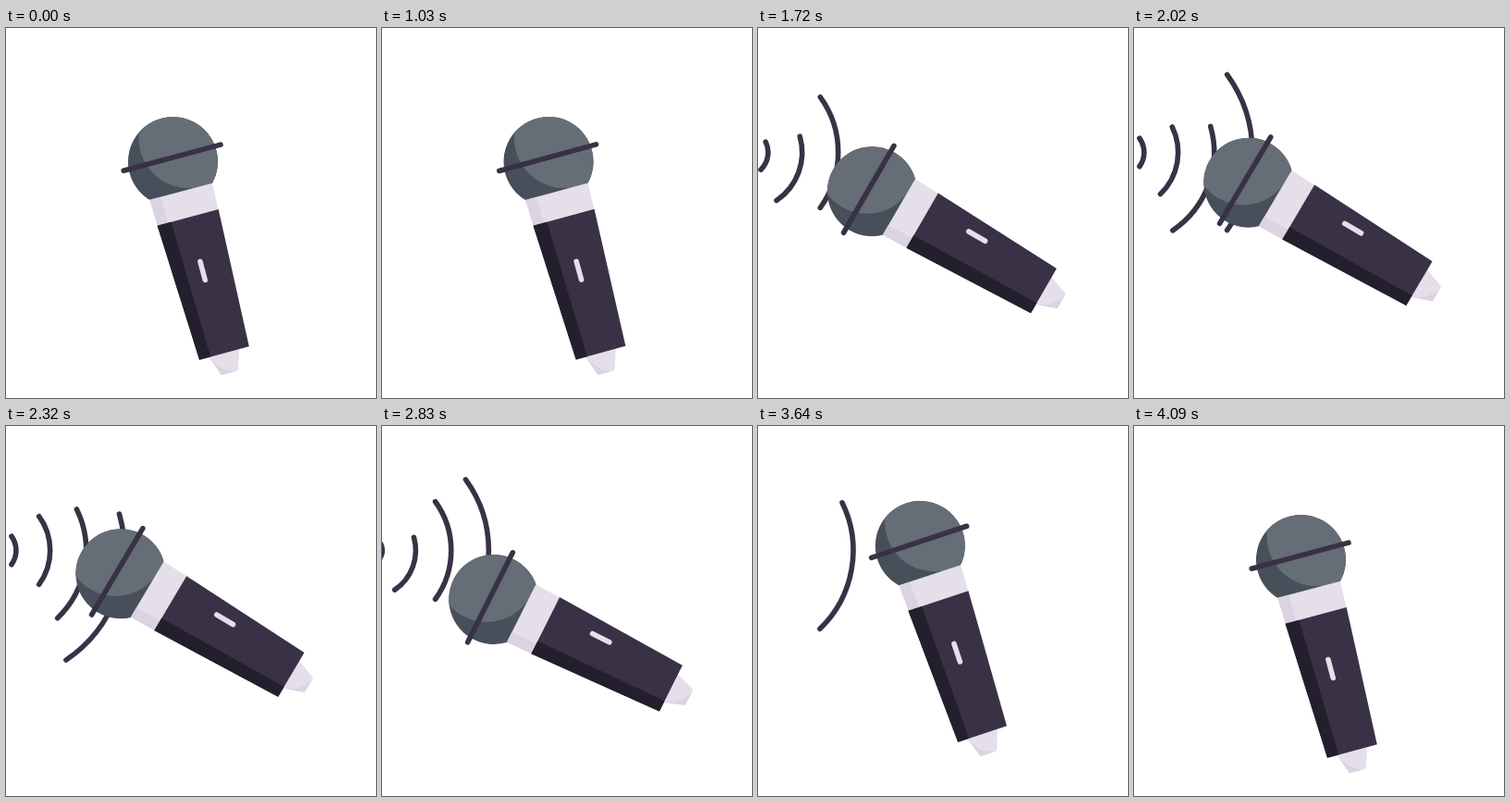
These frames come from a looping animation (400 by 400 pixels, 4120 ms). An HTML page with a canvas:

```html
<!DOCTYPE html>
<html>
<head>
<meta charset="utf-8">
<style>
  html, body { margin: 0; width: 100%; height: 100%; overflow: hidden; background: #fff; }
  canvas { display: block; width: 400px; height: 400px; }
</style>
</head>
<body>
<canvas id="stage"></canvas>
<script>
const LOOP = 4120, STEP = 30, HOLD = 1030;
const REST = -15, BASE_Y = 235.3, LOW_Y = 246;
const BEAT = 324, FIRST_LOW = 1797, LAST_LOW = FIRST_LOW + 6 * BEAT;
const WAVES = 7, WAVE_GAP = 300, WAVE_LIFE = 1205;
const DARK = '#393145', DARK_SHADE = '#231f2d';
const LIGHT = '#e4dfe9', LIGHT_SHADE = '#dcd3e2';
const GREY = '#656d77', GREY_SHADE = '#474f5a';

const canvas = document.getElementById('stage');
const ctx = canvas.getContext('2d');
const scale = window.devicePixelRatio || 1;
canvas.width = canvas.height = 400 * scale;

const rad = deg => deg * Math.PI / 180;
const mix = (a, b, k) => a + (b - a) * k;
function ease(t, from, to) {
  const x = Math.min(1, Math.max(0, (t - from) / (to - from)));
  return x * x * (3 - 2 * x);
}

// Section of the handle; `part` is the share of its width, from the left.
function taper(color, top, bottom, halfTop, halfBottom, part = 1) {
  const right = 2 * part - 1;
  ctx.fillStyle = color;
  ctx.beginPath();
  ctx.moveTo(-halfTop, top);
  ctx.lineTo(halfTop * right, top);
  ctx.lineTo(halfBottom * right, bottom);
  ctx.lineTo(-halfBottom, bottom);
  ctx.fill();
}

function line(color, x1, y1, x2, y2) {
  ctx.strokeStyle = color;
  ctx.beginPath();
  ctx.moveTo(x1, y1);
  ctx.lineTo(x2, y2);
  ctx.stroke();
}

function disc(color, x, y, r) {
  ctx.fillStyle = color;
  ctx.beginPath();
  ctx.arc(x, y, r, 0, 7);
  ctx.fill();
}

function drawWaves(t) {
  if (t <= HOLD) return;
  ctx.strokeStyle = DARK;
  for (let i = 0; i < WAVES; i++) {
    const age = t - 908 - i * WAVE_GAP;
    if (age <= 0 || age > WAVE_LIFE) continue;
    const r = 1.3 + 0.1135 * age + 1.25e-5 * age * age;
    const tilt = (3 - i % 4) % 3 * 10;
    ctx.beginPath();
    ctx.arc(-15, 134.5, r, rad(tilt - 36), rad(tilt + 36));
    ctx.stroke();
  }
}

// Local axes: origin at the centre of the head, y along the handle.
function drawMic(lean) {
  ctx.save();
  ctx.beginPath();
  ctx.arc(0, 0, 48.5, 0, 7);
  ctx.clip();
  disc(GREY_SHADE, 0, 0, 49);
  disc(GREY, 23, -20, 54);
  ctx.restore();

  taper(LIGHT, 33.4, 63, 35, 34);
  taper(LIGHT_SHADE, 33.4, 63, 35, 34, 0.175);

  taper(LIGHT, 213, 236.5, 17.5, 9.2);
  ctx.fillStyle = LIGHT_SHADE;
  ctx.beginPath();
  ctx.moveTo(-17.5, 213);
  ctx.quadraticCurveTo(-10.5, 231, 6, 236.5);
  ctx.lineTo(-9.2, 236.5);
  ctx.fill();

  taper(DARK, 62.6, 214.3, 34.2, 27.8);
  taper(DARK_SHADE, 62.6, 214.3, 34.2, 27.8, 0.225);

  // The switch slides sideways as the handle turns.
  const slot = 0.5 + 14.3 * lean;
  line(LIGHT, slot, 112, slot, 132.5);
  line(DARK, -54, -4.4, 54.5, -4.4);
}

function micPose(t) {
  if (t < HOLD) return { angle: REST, y: BASE_Y, lean: 0 };
  const phase = (t - FIRST_LOW) / BEAT * 2 * Math.PI;
  const enter = ease(t, 1000, 1630);
  const leave = ease(t, 3190, 3730);
  const lean = enter - leave;
  const swing = -61.4 - 2.05 * Math.cos(phase - rad(50));
  const hop = 222.3 + 4.2 * leave + 19.5 * Math.cos(phase);
  const y = t < LAST_LOW
    ? mix(BASE_Y, hop, enter)
    : mix(LOW_Y, BASE_Y, ease(t, LAST_LOW, 4090));
  return { angle: mix(REST, swing, lean), y, lean };
}

function draw(t) {
  ctx.setTransform(scale, 0, 0, scale, 0, 0);
  ctx.fillStyle = '#fff';
  ctx.fillRect(0, 0, 400, 400);
  ctx.lineCap = 'round';
  ctx.lineWidth = 5.6;
  drawWaves(t);
  const { angle, y, lean } = micPose(t);
  ctx.translate(204.8, y);
  ctx.rotate(rad(angle));
  ctx.translate(0, -94);
  drawMic(lean);
}

const start = performance.now();
function tick() {
  const t = Math.max(0, performance.now() - start) % LOOP;
  draw(Math.floor((t - 10) / STEP) * STEP + 10);
  requestAnimationFrame(tick);
}
tick();
</script>
</body>
</html>
```
